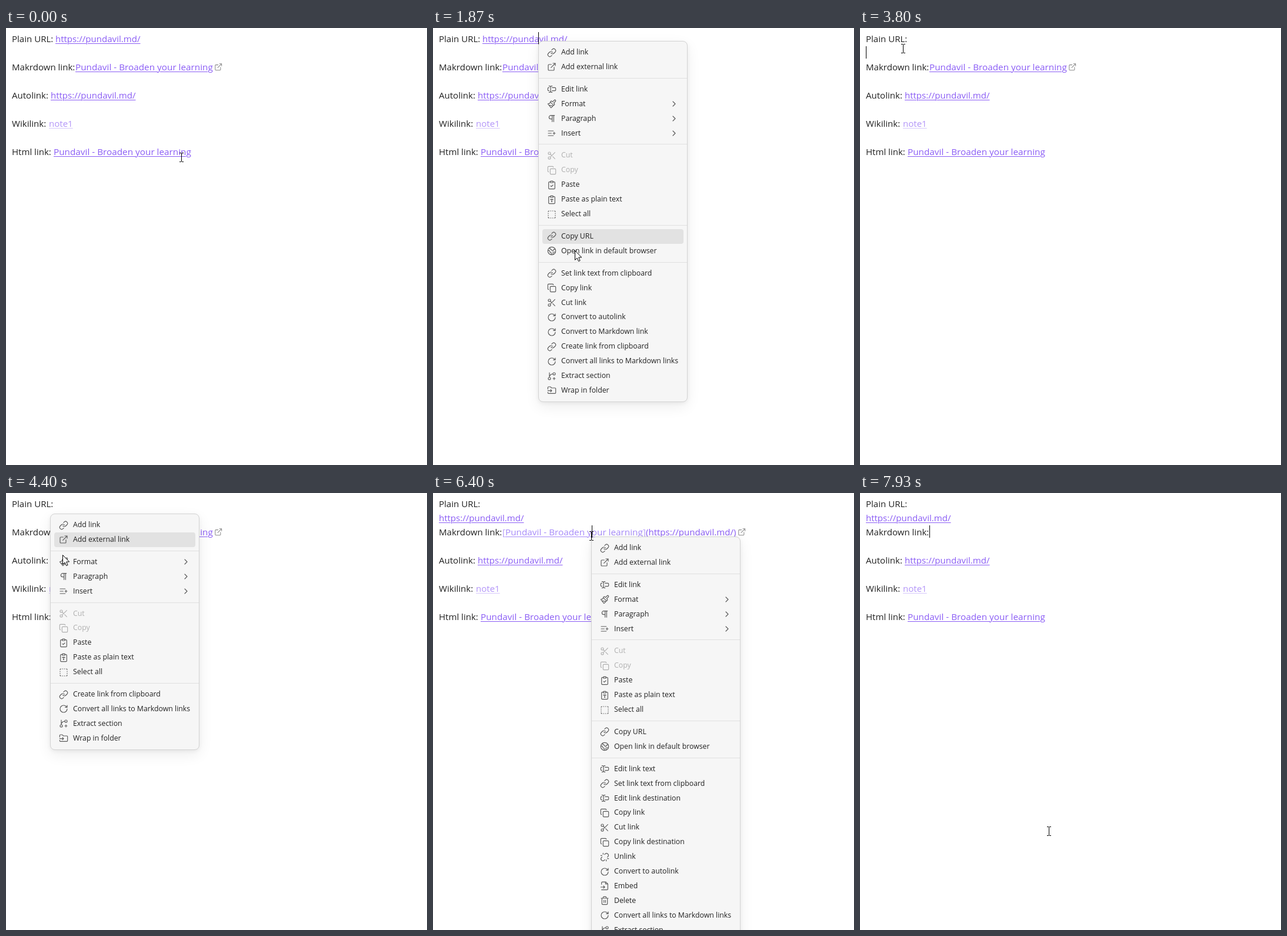
Animation of 716x743 px, one loop 8000 ms. Source, as an HTML page:

```html
<!DOCTYPE html>
<html lang="en">
<head>
<meta charset="utf-8">
<title>Link menu</title>
<style>
  html, body { margin: 0; width: 100%; height: 100%; overflow: hidden; background: #fff; }
  body { position: relative; color: #222; font: 15.05px "Open Sans", "Noto Sans", sans-serif; cursor: none; }
  body > * { position: absolute; }
  .line { line-height: 24px; white-space: pre; }
  .link { color: #8a5cf5; text-decoration: underline 1px; text-underline-offset: 2px; }
  .title { font-size: 15.3px; }
  .plain { text-decoration: none; }
  .bracket { color: #b79ff9; }
  .wiki { color: #b294f8; text-decoration-color: #d6c8fb; }
  .hover { color: #a68af9; text-decoration: underline 1px; }
  svg { position: absolute; overflow: visible; fill: none; stroke: currentColor; stroke-linecap: round; stroke-linejoin: round; }
  .icon { width: 16px; height: 16px; stroke-width: 1.75; }
  .ext { color: #8c8c8c; }
  .ext .icon { width: 14.5px; height: 14.5px; }
  #caret { width: 1px; height: 21px; background: #000; }
  .menu { box-sizing: border-box; width: 254px; background: #f6f6f6; border: 1px solid #d3d3d3; border-radius: 8px;
    box-shadow: 0 2px 7px rgba(0,0,0,.06), 0 8px 25px rgba(0,0,0,.07); font-size: 12.3px; }
  .menu > * { position: absolute; }
  .row { left: 6px; width: 240px; height: 24.9px; line-height: 24.9px; border-radius: 4px; white-space: pre; }
  .row span { position: absolute; left: 32px; }
  .row .icon { left: 8px; top: 4.5px; color: #5a5a5a; }
  .row .icon.more { left: 216px; }
  .row.off, .row.off .icon { color: #b0b0b0; }
  .row.on { background: #e2e2e2; }
  .sep { left: 0; right: 0; height: 1px; background: #e0e0e0; }
  #mouse { width: 1px; height: 1px; stroke-linecap: butt; }
</style>
</head>
<body>
<script>
const LOOP = 8000, FRAME = 200 / 3, ROW = 24.9, GAP = 13, BLINK = 530;
const NAME = 'Pundavil - Broaden your learning', ADDRESS = 'https://pundavil.md/';

const board = 'M9 2h6v4H9zM16 4h2a2 2 0 0 1 2 2v14a2 2 0 0 1-2 2H6a2 2 0 0 1-2-2V6a2 2 0 0 1 2-2h2';
const ICONS = {
  link: 'M10 13a5 5 0 0 0 7.54.54l3-3a5 5 0 0 0-7.07-7.07l-1.72 1.71M14 11a5 5 0 0 0-7.54-.54l-3 3a5 5 0 0 0 7.07 7.07l1.71-1.71',
  external: 'M15 3h6v6M10 14 21 3M18 13v6a2 2 0 0 1-2 2H5a2 2 0 0 1-2-2V8a2 2 0 0 1 2-2h6',
  edit: 'M5 4h1a3 3 0 0 1 3 3 3 3 0 0 1 3-3h1M13 20h-1a3 3 0 0 1-3-3 3 3 0 0 1-3 3H5M5 16H4a2 2 0 0 1-2-2v-4a2 2 0 0 1 2-2h1M13 8h7a2 2 0 0 1 2 2v4a2 2 0 0 1-2 2h-7M9 7v10',
  brush: 'M18.4 2.6 14 7l-1.6-1.6a2 2 0 0 0-2.8 0L8 7l9 9 1.6-1.6a2 2 0 0 0 0-2.8L17 10l4.4-4.4a2.1 2.1 0 1 0-3-3ZM9 8c-2 3-4 3.5-7 4l8 10c2-1 6-5 6-7M14.5 17.5 4.5 15',
  pilcrow: 'M13 4v16M17 4v16M19 4H9.5a4.5 4.5 0 0 0 0 9H13',
  insert: 'M11 12H3M16 6H3M16 18H3M18 9v6M21 12h-6',
  cut: 'M9 6a3 3 0 1 1-6 0 3 3 0 0 1 6 0M9 18a3 3 0 1 1-6 0 3 3 0 0 1 6 0M20 4 8.1 15.9M14.5 14.5 20 20M8.1 8.1 12 12',
  copy: 'M10 8h10a2 2 0 0 1 2 2v10a2 2 0 0 1-2 2H10a2 2 0 0 1-2-2V10a2 2 0 0 1 2-2M4 16a2 2 0 0 1-2-2V4a2 2 0 0 1 2-2h10a2 2 0 0 1 2 2',
  paste: board + 'M9 14l2 2 4-4',
  pasteText: board + 'M9 12v-1h6v1M11 17h2M12 11v6',
  select: 'M5 3a2 2 0 0 0-2 2M19 3a2 2 0 0 1 2 2M21 19a2 2 0 0 1-2 2M5 21a2 2 0 0 1-2-2M9 3h1M9 21h1M14 3h1M14 21h1M3 9v1M21 9v1M3 14v1M21 14v1',
  globe: 'M22 12a10 10 0 1 1-20 0 10 10 0 0 1 20 0M21.5 15H17a2 2 0 0 0-2 2v4.5M7 3.3V5a3 3 0 0 0 3 3 2 2 0 0 1 2 2 2 2 0 0 0 4 0 2 2 0 0 1 2-2h3.2M11 22v-4a2 2 0 0 0-2-2 2 2 0 0 1-2-2v-1a2 2 0 0 0-2-2H2',
  convert: 'M21 12a9 9 0 1 1-9-9c2.5 0 4.9 1 6.7 2.7L21 8M21 3v5h-5',
  extract: 'M6 3v12M18 9a3 3 0 1 0 0-6 3 3 0 0 0 0 6zM6 21a3 3 0 1 0 0-6 3 3 0 0 0 0 6zM15 6a9 9 0 0 0-9 9M18 15v6M21 18h-6',
  folder: 'M2 9V5a2 2 0 0 1 2-2h3.9a2 2 0 0 1 1.7.9l.8 1.2a2 2 0 0 0 1.7.9H20a2 2 0 0 1 2 2v10a2 2 0 0 1-2 2H4a2 2 0 0 1-2-2v-1M2 13h10M9 16l3-3-3-3',
  unlink: 'M18.8 12.3l1.7-1.7a5 5 0 0 0-7-7l-1.7 1.7M5.2 11.8l-1.7 1.7a5 5 0 0 0 7 7l1.7-1.7M8 2v3M2 8h3M16 19v3M19 16h3',
  embed: 'M4 22h14a2 2 0 0 0 2-2V7l-5-5H6a2 2 0 0 0-2 2v4M14 2v5h6M2 15h10M9 18l3-3-3-3',
  trash: 'M3 6h18M19 6v14a2 2 0 0 1-2 2H7a2 2 0 0 1-2-2V6M8 6V4a2 2 0 0 1 2-2h4a2 2 0 0 1 2 2v2M10 11v6M14 11v6',
  more: 'm9 18 6-6-6-6'
};
const POINTERS = {
  beam: 'M-3-7.5h3M1-7.5h3M.5-7v14M-3 7.5h3M1 7.5h3',
  arrow: 'M.5.5V16.5L4 13l2.6 5.6 2.5-1.1L6.7 12h5z',
  hand: 'M-1.5 14V1.8a1.5 1.5 0 0 1 3 0V7.5q1.6-1.4 3 .3q1.8-1 3 .6q2-.7 3 1.1V15q0 3-2 4.5V22H-2.5V19.5L-6 13.7q-.7-2 1-2.3q1.4 0 3.5 2.6z'
};

function add(parent, cls, left, top, html = '') {
  const el = document.createElement('div');
  el.className = cls;
  if (left != null) el.style.left = left + 'px';
  el.style.top = top + 'px';
  el.innerHTML = html;
  return parent.appendChild(el);
}
const show = (el, on) => { el.style.display = on ? '' : 'none'; };
const icon = (name, cls = '') => `<svg class="icon ${cls}" viewBox="0 0 24 24"><path d="${ICONS[name]}"/></svg>`;

// Document text: x, line number, text
const text = (x, n, s, cls = '') => add(document.body, 'line ' + cls, x, 6 + 24 * n, s);
const links = [];
function link(x, n, s, from = 0, to = LOOP, cls = '', width = 145) {
  links.push({ x, n, from, to, width, el: text(x, n, s, 'link ' + cls) });
}
const timed = [];
const during = (from, to, el) => timed.push({ from, to, el });

const CUT_URL = 2666, PASTED = 5198, OPENED = 6266, CUT_TITLE = 7930;
['Plain URL:', 'Makrdown link:', 'Autolink:', 'Wikilink:', 'Html link:']
  .forEach((s, i) => text(10, 2 * i, s));
link(84, 0, ADDRESS, 0, CUT_URL);
link(10, 1, ADDRESS, PASTED);
link(118, 2, NAME, 0, OPENED, 'title', 234);
link(123, 2, NAME, OPENED, CUT_TITLE, 'title plain', 234);
link(76, 4, ADDRESS);
link(73, 6, 'note1', 0, LOOP, 'wiki', 41);
link(81, 8, NAME, 0, LOOP, 'title', 234);
during(OPENED, CUT_TITLE, text(118, 2, '[', 'bracket'));
during(OPENED, CUT_TITLE, text(357, 2, ']', 'bracket'));
during(OPENED, CUT_TITLE, text(362, 2, `(${ADDRESS})`, 'link'));
during(0, OPENED, add(document.body, 'ext', 354, 58.8, icon('external')));
during(OPENED, CUT_TITLE, add(document.body, 'ext', 518, 58.8, icon('external')));

const caret = add(document.body, '', 0, 0);
caret.id = 'caret';

// Menu groups: [icon, label, flag]
const adding = [['link', 'Add link'], ['external', 'Add external link']];
const editLink = ['edit', 'Edit link'];
const format = [['brush', 'Format', 'more'], ['pilcrow', 'Paragraph', 'more'], ['insert', 'Insert', 'more']];
const clip = [['cut', 'Cut', 'off'], ['copy', 'Copy', 'off'], ['paste', 'Paste'],
  ['pasteText', 'Paste as plain text'], ['select', 'Select all']];
const open = [['link', 'Copy URL'], ['globe', 'Open link in default browser']];
const setText = ['link', 'Set link text from clipboard'];
const copyLink = ['copy', 'Copy link'], cutLink = ['cut', 'Cut link'];
const autolink = ['convert', 'Convert to autolink'];
const create = ['link', 'Create link from clipboard'];
const tail = [['convert', 'Convert all links to Markdown links'], ['extract', 'Extract section'], ['folder', 'Wrap in folder']];

function makeMenu(from, to, x, y, groups) {
  const el = add(document.body, 'menu', x, y), rows = [];
  let at = 6;
  groups.forEach((group, g) => {
    if (g) {
      add(el, 'sep', null, Math.round(at + GAP / 2 - .5));
      at += GAP;
    }
    for (const [name, label, flag] of group) {
      const html = icon(name) + `<span>${label}</span>` + (flag === 'more' ? icon('more', 'more') : '');
      rows.push({ at, off: flag === 'off', el: add(el, 'row ' + (flag === 'off' ? 'off' : ''), null, at, html) });
      at += ROW;
    }
  });
  el.style.height = at + 8 + 'px';
  return { from, to, x, y, height: at + 8, el, rows };
}
const menus = [
  makeMenu(866, CUT_URL, 179, 22, [adding, [editLink, ...format], clip, open,
    [setText, copyLink, cutLink, autolink, ['convert', 'Convert to Markdown link'], create, ...tail]]),
  makeMenu(4066, PASTED, 75, 35, [adding, format, clip, [create, ...tail]]),
  makeMenu(6330, CUT_TITLE, 269, 74, [adding, [editLink, ...format], clip, open,
    [['edit', 'Edit link text'], setText, ['edit', 'Edit link destination'], copyLink, cutLink,
      ['copy', 'Copy link destination'], ['unlink', 'Unlink'], autolink, ['embed', 'Embed'], ['trash', 'Delete'], ...tail]])
];

document.body.insertAdjacentHTML('beforeend', '<svg id="mouse"><path/></svg>');
const mouse = document.getElementById('mouse'), shape = mouse.firstChild;

// Pointer path: time, x, y
const PATH = [[0, 298, 220], [600, 179, 22], [1133, 179, 22], [1800, 236, 350], [1867, 241, 378], [2000, 246, 428],
  [2400, 250, 463], [2600, 250, 463], [3467, 74, 33], [3600, 74, 32], [3800, 73, 35], [4000, 73, 35], [4067, 75, 35],
  [4200, 76, 38], [4867, 143, 261], [4933, 143, 262], [5133, 143, 262], [5200, 144, 264], [5800, 268, 61],
  [5933, 268, 61], [6133, 269, 73], [6733, 269, 73], [7067, 305, 327], [7333, 322, 485], [7400, 324, 514],
  [7600, 320, 573], [7867, 320, 573], [7933, 321, 575]];
// Caret: time, x, line
const CARETS = [[800, 179, 0], [CUT_URL, 84, 0], [3730, 10, 1], [PASTED, 154, 1], [OPENED, 270, 2], [CUT_TITLE, 118, 2]];

function pointerAt(t) {
  const i = PATH.findIndex(k => k[0] > t);
  if (i < 0) return PATH[PATH.length - 1].slice(1);
  const [t0, x0, y0] = PATH[Math.max(i - 1, 0)], [t1, x1, y1] = PATH[i];
  const u = t1 > t0 ? (t - t0) / (t1 - t0) : 0;
  return [Math.round(x0 + (x1 - x0) * u), Math.round(y0 + (y1 - y0) * u)];
}
const active = (o, t) => t >= o.from && t < o.to;
const inside = (m, x, y) => x > m.x && x < m.x + 254 && y > m.y && y < m.y + m.height;

function render(t) {
  const [x, y] = pointerAt(t), [px, py] = pointerAt(Math.max(0, t - FRAME));
  let kind = 'beam';

  const spot = CARETS.filter(c => c[0] <= t).pop();
  show(caret, spot && Math.floor((t - spot[0]) / BLINK) % 2 === 0);
  if (spot) {
    caret.style.left = spot[1] + 'px';
    caret.style.top = 7 + 24 * spot[2] + 'px';
  }

  // The row highlight trails the pointer by one step
  for (const m of menus) {
    const on = active(m, t);
    show(m.el, on);
    if (!on) continue;
    if (inside(m, x, y)) kind = 'arrow';
    const hit = inside(m, px, py) ? m.rows.filter(r => m.y + 1 + r.at <= py).pop() : null;
    for (const r of m.rows) r.el.classList.toggle('on', r === hit && !r.off);
  }

  for (const l of links) {
    const on = active(l, t);
    const over = on && kind !== 'arrow' && x >= l.x && x <= l.x + l.width && Math.abs(y - 18.5 - 24 * l.n) < 9;
    show(l.el, on);
    l.el.classList.toggle('hover', over);
    if (over && !(spot && spot[2] === l.n)) kind = 'hand';
  }
  for (const o of timed) show(o.el, active(o, t));

  mouse.style.left = x + 'px';
  mouse.style.top = y + 'px';
  shape.setAttribute('d', POINTERS[kind]);
  shape.setAttribute('fill', kind === 'beam' ? 'none' : '#fff');
  shape.setAttribute('stroke', '#000');
}

function tick() {
  const t = performance.now() % LOOP;
  render(Math.floor((t + 5) / FRAME) * FRAME);
  requestAnimationFrame(tick);
}
tick();
</script>
</body>
</html>
```
